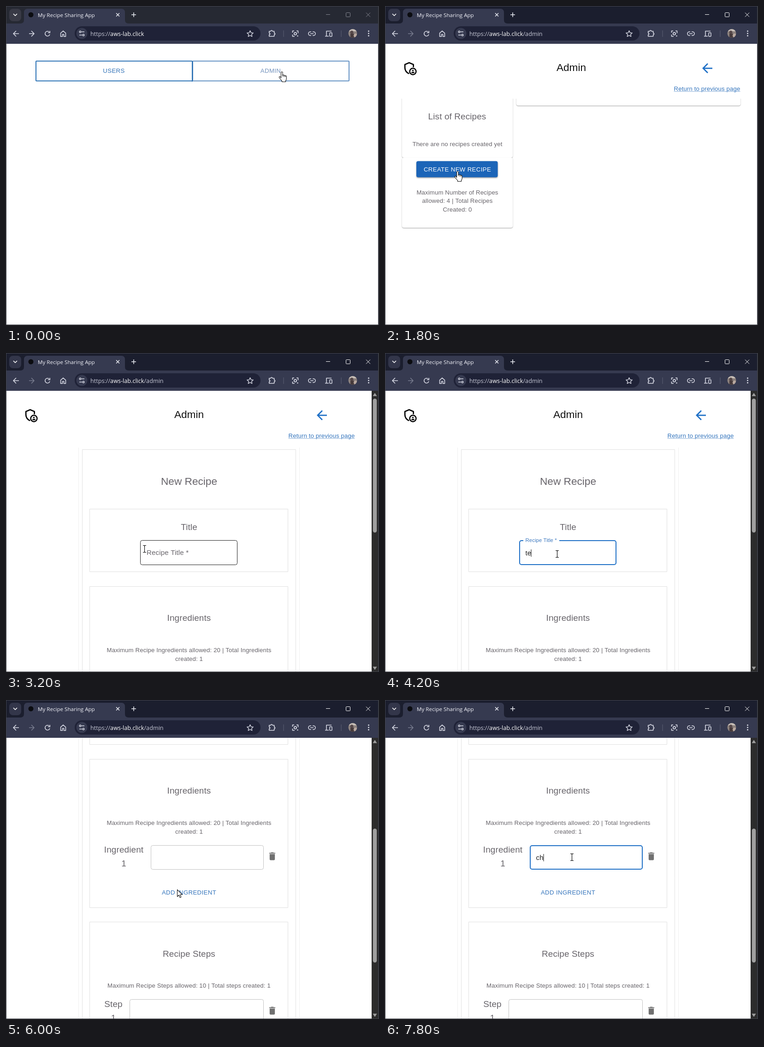
Animation of 809 by 692 pixels, one loop 8000 ms. Source, as an HTML page with a canvas:

```html
<!DOCTYPE html>
<html lang="en">
<head>
<meta charset="utf-8">
<title>My Recipe Sharing App</title>
<style>
html, body { margin: 0; width: 100%; height: 100%; overflow: hidden; background: #fff; }
canvas { display: block; }
</style>
</head>
<body>
<canvas id="stage" width="809" height="692"></canvas>
<script>
const ctx = document.getElementById('stage').getContext('2d');
const LOOP = 8000, STEP = 200;
const PAGE = '"Liberation Sans", Arial, sans-serif';
const UI = '"Open Sans", "Noto Sans", sans-serif';
const BLUE = '#1f70c6', GREY = '#67646a', LINE = '#e0e0e0', INK = '#d9dbe6';

// type styles: size, letter spacing in em
const H5 = [22.65, 0], H6 = [18.88, .0075], BODY = [13.2, .0107],
      INPUT = [15.1, .0094], BUTTON = [13.2, .0286], SMALL = [11.3, .0094];

// pointer path: time, x, y, shape
const POINTER = [
  [0, 592, 142, 'hand'], [200, 591, 138, 'hand'], [600, 591, 138, 'arrow'],
  [1000, 564, 148, 'arrow'], [1200, 440, 215, 'arrow'], [1400, 270, 300, 'arrow'],
  [1600, 160, 352, 'hand'], [1800, 151, 358, 'hand'], [2400, 152, 358, 'arrow'],
  [2800, 152, 358, 'arrow'], [3200, 300, 425, 'beam'], [3400, 373, 436, 'beam'],
  [4800, 373, 436, 'beam'], [5000, 375, 441, 'beam'], [5600, 375, 441, 'beam'],
  [5800, 371, 411, 'arrow'], [6000, 371, 411, 'arrow'], [6400, 396, 360, 'beam'],
  [6600, 405, 341, 'beam'], [LOOP, 405, 341, 'beam']
];
const SCROLL = [[0, 0], [5000, 375], [5200, 285], [5400, 340], [5600, 402], [5800, 378]];
const TITLE = [[0, ''], [4000, 't'], [4200, 'te'], [4600, 'tes'], [4800, 'test']];
const ITEM = [[0, ''], [7600, 'c'], [7800, 'ch']];

const ICON = {
  back: new Path2D('M20 11H7.83l5.59-5.59L12 4l-8 8 8 8 1.41-1.41L7.83 13H20v-2z'),
  bin: new Path2D('M6 19c0 1.1.9 2 2 2h8c1.1 0 2-.9 2-2V7H6v12zM19 4h-3.5l-1-1h-5l-1 1H5v2h14V4z'),
  shield: new Path2D('M17 10V6L10.5 3.2 4 6v5c0 4 2.6 7.6 6.5 8.9'),
  puzzle: new Path2D('M4 6h4.5a2.3 2.3 0 0 1 4.6 0H18v4.9a2.3 2.3 0 0 1 0 4.6V20H4v-4.5a2.3 2.3 0 0 0 0-4.6z'),
  star: new Path2D('M12 3.5l2.6 5.7 6.2.7-4.6 4.2 1.3 6.1L12 17.1l-5.5 3.1 1.3-6.1-4.6-4.2 6.2-.7z'),
  home: new Path2D('M5 10.5l7-6 7 6V20h-5v-6h-4v6H5z'),
  arrow: new Path2D('M.5.5V15.5L4 12.2 6.4 17.7 8.9 16.6 6.6 11.2H11.3Z'),
  hand: new Path2D('M4.5 14V2.5a1.8 1.8 0 0 1 3.6 0V8q1.7-1.4 3 .6 1.7-1 2.7.8 2.4-.7 2.4 1.8V16q0 2.5-1.7 4v2.5H6.5V20.5L1 14Q-.5 11.5 1.8 11Q3 11.2 4.5 14Z')
};

const at = (list, t) => list.reduce((v, k) => t >= k[0] ? k[1] : v, list[0][1]);

function pointer(t) {
  let i = 0;
  while (i < POINTER.length - 2 && t >= POINTER[i + 1][0]) i++;
  const [t0, x0, y0, shape] = POINTER[i], [t1, x1, y1] = POINTER[i + 1];
  const u = (t - t0) / (t1 - t0);
  return { x: x0 + (x1 - x0) * u, y: y0 + (y1 - y0) * u, shape };
}

function rect(x, y, w, h, fill) { ctx.fillStyle = fill; ctx.fillRect(x, y, w, h); }

function round(x, y, w, h, r, fill, stroke, width = 1) {
  ctx.beginPath();
  ctx.roundRect(x, y, w, h, r);
  if (fill) { ctx.fillStyle = fill; ctx.fill(); }
  if (stroke) { ctx.strokeStyle = stroke; ctx.lineWidth = width; ctx.stroke(); }
}

function disc(x, y, r, fill, stroke, width = 1.5) {
  ctx.beginPath();
  ctx.arc(x, y, r, 0, 7);
  if (fill) { ctx.fillStyle = fill; ctx.fill(); }
  if (stroke) { ctx.strokeStyle = stroke; ctx.lineWidth = width; ctx.stroke(); }
}

// each argument after the width is one polyline of x, y pairs
function lines(color, width, ...runs) {
  ctx.strokeStyle = color;
  ctx.lineWidth = width;
  ctx.beginPath();
  for (const p of runs)
    for (let i = 0; i < p.length; i += 2) ctx[i ? 'lineTo' : 'moveTo'](p[i], p[i + 1]);
  ctx.stroke();
}

function icon(path, cx, cy, scale, color, width) {
  ctx.save();
  ctx.translate(cx - 12 * scale, cy - 12 * scale);
  ctx.scale(scale, scale);
  ctx.fillStyle = ctx.strokeStyle = color;
  if (width) { ctx.lineWidth = width; ctx.stroke(path); } else ctx.fill(path);
  ctx.restore();
}

function text(str, x, y, [size, gap], color, align = 'center', font = PAGE) {
  ctx.font = `${size}px ${font}`;
  ctx.letterSpacing = `${gap * size}px`;
  ctx.fillStyle = color;
  const w = ctx.measureText(str).width;
  ctx.fillText(str, align === 'center' ? x - w / 2 : x, y);
  return w;
}

function windowBar(active, admin) {
  rect(0, 0, 809, 82, active ? '#1b1e2e' : '#262933');
  round(7, 6, 26, 27, 8, active ? '#33364a' : '#393a46');
  lines('#fff', 1.6, [16, 17, 20, 21, 24, 17]);
  const bar = '#363a50';
  ctx.fillStyle = bar;
  ctx.beginPath();
  ctx.moveTo(31, 38);
  ctx.quadraticCurveTo(39, 38, 39, 30);
  ctx.lineTo(39, 14);
  ctx.quadraticCurveTo(39, 6, 47, 6);
  ctx.lineTo(250, 6);
  ctx.quadraticCurveTo(258, 6, 258, 14);
  ctx.lineTo(258, 30);
  ctx.quadraticCurveTo(258, 38, 266, 38);
  ctx.fill();
  rect(1, 38, 807, 44, bar);
  disc(54, 19, 5.5, '#0b0c10');
  text('My Recipe Sharing App', 69, 24, [11.6, 0], '#f1f2f8', 'left', UI);
  lines('#eceef5', 1.5, [239, 15.5, 246, 22.5], [246, 15.5, 239, 22.5],
    [272, 19, 282, 19], [277, 14, 277, 24]);
  const ctl = active ? '#fff' : '#868892';
  lines(ctl, 1, [694, 18.5, 703, 18.5], [781, 14.5, 790, 23.5], [790, 14.5, 781, 23.5]);
  round(737.5, 14.5, 9, 9, 1, null, ctl);
  toolbar(admin);
}

function toolbar(admin) {
  lines(INK, 1.6, [28, 60, 16, 60], [22, 54, 16, 60, 22, 66]);
  lines(admin ? '#777b8d' : INK, 1.6, [50, 60, 61, 60], [55, 54, 61, 60, 55, 66]);
  ctx.strokeStyle = INK;
  ctx.beginPath();
  ctx.arc(90, 60, 5.2, .3, 5.4);
  ctx.stroke();
  rect(91, 57, 5, 1.6, INK);
  rect(94.4, 54, 1.6, 4.6, INK);
  icon(ICON.home, 124, 60, .78, INK, 2);

  round(149, 44, 403, 31, 15.5, '#1f2237');
  disc(164.5, 59.5, 12, '#363a50');
  lines(INK, 1.5, [164, 56, 170, 56], [159, 63, 165, 63]);
  disc(161, 56, 1.8, null, INK, 1.4);
  disc(168, 63, 1.8, null, INK, 1.4);
  const style = [12.65, 0];
  let x = 183;
  x += text('https://', x, 64.5, style, '#c9cbd8', 'left', UI);
  x += text('aws-lab.click', x, 64.5, style, '#fff', 'left', UI);
  if (admin) text('/admin', x, 64.5, style, '#c9cbd8', 'left', UI);

  icon(ICON.star, 529.5, 60, .76, INK, 1.8);
  icon(ICON.puzzle, 577, 59.5, .78, INK, 2);
  rect(601.5, 53, 1, 14, '#5c6074');
  rect(726.5, 53, 1, 14, '#5c6074');
  lines(INK, 1.6, [621.5, 58, 621.5, 54, 625, 54], [630, 54, 633.5, 54, 633.5, 59],
    [621.5, 62, 621.5, 66, 626, 66]);
  disc(627.5, 60, 2.7, null, INK, 1.7);
  disc(632.5, 65, 1.3, INK);
  lines(INK, 1.6, [662, 56, 660, 56], [662, 64, 660, 64], [665, 56, 667, 56],
    [665, 64, 667, 64], [660, 60, 667, 60]);
  ctx.beginPath();
  ctx.arc(660, 60, 4, Math.PI / 2, Math.PI * 1.5);
  ctx.moveTo(667, 56);
  ctx.arc(667, 60, 4, -Math.PI / 2, Math.PI / 2);
  ctx.stroke();
  lines(INK, 1.6, [706, 54.5, 695, 54.5, 695, 65], [692, 65.5, 700, 65.5]);
  round(702, 58, 5, 8, 1, null, INK, 1.5);
  disc(752, 59.5, 9.5, '#8b817d');
  ctx.save();
  ctx.clip();
  rect(742, 49, 20, 6, '#c6bdb6');
  rect(747, 60, 8, 10, '#473b3c');
  disc(750, 57, 3.5, '#564849');
  disc(758, 64, 4, '#b9a9a0');
  ctx.restore();
  for (const y of [54.5, 59.5, 64.5]) disc(786.5, y, 1.5, INK);
}

function homePage() {
  round(65, 119.5, 339, 43, 1, null, '#2a72b5', 2);
  round(405, 119.5, 339, 43, 1, null, '#6391c3', 2);
  rect(403, 119, 2, 45, '#2a72b5');
  text('USERS', 234, 145, BUTTON, '#3273b8');
  text('ADMIN', 574, 145, BUTTON, '#7292bd');
}

function header(mid, right) {
  icon(ICON.shield, 54.5, 135.5, 1.42, '#000', 1.9);
  disc(60.5, 142, 8.4, '#fff');
  disc(60.5, 142, 6.9, '#fff', '#000', 2.5);
  disc(60.5, 139.9, 1.7, '#000');
  round(57.2, 142.8, 6.6, 3, 1.5, '#000');
  text('Admin', mid, 141, H5, '#111');
  icon(ICON.back, right - 72, 135, 1.375, BLUE);
  const x = right - 144.5;
  const w = text('Return to previous page', x, 183.5, BODY, '#3475bd', 'left');
  rect(x, 185, w, 1, '#8fb2da');
}

function paper(x, y, w, h) {
  ctx.save();
  ctx.shadowColor = 'rgba(0,0,0,.38)';
  ctx.shadowBlur = 2;
  ctx.shadowOffsetY = 1;
  round(x, y, w, h, 4, '#fff');
  ctx.restore();
}

function adminPage(hover) {
  paper(37, 190, 240, 139);
  paper(37, 329, 240, 152);
  paper(285, 190, 486, 26);
  rect(30, 186, 750, 15, '#fff');
  header(404, 771);
  text('List of Recipes', 156.5, 246, H6, GREY);
  text('There are no recipes created yet', 157, 303.5, BODY, GREY);
  ctx.save();
  ctx.shadowColor = 'rgba(0,0,0,.4)';
  ctx.shadowBlur = 3;
  ctx.shadowOffsetY = 1.5;
  round(68, 336.5, 176.5, 35, 4, hover ? '#1c65b8' : '#2477cf');
  ctx.restore();
  text('CREATE NEW RECIPE', 157, 358.5, BUTTON, '#fff');
  ['Maximum Number of Recipes', 'allowed: 4 | Total Recipes', 'Created: 0']
    .forEach((s, i) => text(s, 157, 408.5 + i * 18.9, BODY, GREY));
}

// returns the x where the typed value ends
function field(x, y, w, h, state, value, baseline) {
  const focus = state === 'focus', line = focus ? 2 : 1;
  round(x + line / 2, y + line / 2, w - line, h - line, 4, '#fff',
    focus ? BLUE : state === 'hover' ? '#222' : '#c2c2c2', line);
  return x + 13.5 + text(value, x + 13.5, baseline, INPUT, '#222', 'left');
}

const caret = (x, y) => rect(Math.round(x) - .5, y, 1, 16, '#111');

function card(y, h) {
  ctx.strokeStyle = LINE;
  ctx.lineWidth = 1;
  ctx.strokeRect(181.5, y + .5, 430, h);
}

function formPage(t, mouse) {
  const scroll = at(SCROLL, t), last = at(SCROLL, t - STEP);
  const over = (x, y, w, h) => mouse.x > x && mouse.x < x + w &&
    mouse.y + last > y && mouse.y + last < y + h;
  const inTitle = t >= 3600 && t < 6800, inItem = t >= 6800;
  const title = at(TITLE, t), item = at(ITEM, t), mid = 397;

  ctx.save();
  ctx.translate(0, -scroll);
  header(mid, 757);
  rect(157, 205, 1, 1200, '#efefef');
  rect(636, 205, 1, 1200, '#efefef');
  ctx.strokeStyle = LINE;
  ctx.lineWidth = 1;
  ctx.strokeRect(165.5, 209.5, 463, 1200);
  text('New Recipe', mid, 286, H5, GREY);

  card(338, 136);
  text('Title', mid, 384, H6, GREY);
  const titleState = inTitle ? 'focus' : over(291, 406, 211, 54) ? 'hover' : '';
  const end = field(291, 406, 211, 54, titleState, title, 439);
  if (inTitle || title) {
    rect(300, 404, 78, 5, '#fff');
    text('Recipe Title *', 304.5, 410, SMALL, inTitle ? '#3c78bf' : GREY, 'left');
  } else text('Recipe Title *', 305, 438, INPUT, GREY, 'left');
  if (inTitle && t < 5000) caret(end, 426);

  card(506, 322);
  text('Ingredients', mid, 581, H6, GREY);
  text('Maximum Recipe Ingredients allowed: 20 | Total Ingredients', mid, 648.5, BODY, GREY);
  text('created: 1', mid, 667.5, BODY, GREY);
  text('Ingredient', 255.5, 709, H6, GREY);
  text('1', 255.5, 739, H6, GREY);
  const itemState = inItem ? 'focus' : over(314, 693, 245, 53) ? 'hover' : '';
  const tail = field(314, 693, 245, 53, itemState, item, 725);
  if (inItem) caret(tail, 712);
  icon(ICON.bin, 577.5, 717, .944, '#707070');
  text('ADD INGREDIENT', mid, 800, BUTTON, '#3575bc');

  card(859, 500);
  text('Recipe Steps', mid, 934.5, H6, GREY);
  text('Maximum Recipe Steps allowed: 10 | Total steps created: 1', mid, 1002, BODY, GREY);
  text('Step', 233, 1043.5, H6, GREY);
  text('1', 233, 1073.5, H6, GREY);
  field(268, 1027, 291, 53, '', '', 1060);
  icon(ICON.bin, 577.5, 1052, .944, '#707070');
  ctx.restore();

  rect(793, 82, 14, 609, '#2c2c2c');
  round(795.8, 99 + scroll * .476, 8.4, 290.5, 4.2, '#9f9f9f');
  ctx.fillStyle = '#9f9f9f';
  for (const [y, d] of [[90, 1], [684, -1]]) {
    ctx.beginPath();
    ctx.moveTo(795.5, y + 3.5 * d);
    ctx.lineTo(804.5, y + 3.5 * d);
    ctx.lineTo(800, y - 3.5 * d);
    ctx.fill();
  }
}

function drawPointer({ x, y, shape }) {
  x = Math.round(x);
  y = Math.round(y);
  if (shape === 'beam') {
    const half = d => [x + d * 3.5 + .5, y - 7.5, x + d + .5, y - 7.5, x + .5, y - 6.5,
      x + .5, y + 6.5, x + d + .5, y + 7.5, x + d * 3.5 + .5, y + 7.5];
    lines('#111', 1.2, half(-1), half(1));
    return;
  }
  ctx.save();
  ctx.translate(x, y);
  ctx.fillStyle = '#fff';
  ctx.strokeStyle = '#111';
  ctx.lineWidth = 1.1;
  ctx.fill(ICON[shape]);
  ctx.stroke(ICON[shape]);
  if (shape === 'hand') lines('#111', 1, [8.1, 7, 8.1, 11], [11, 8.5, 11, 12], [13.8, 9.5, 13.8, 12]);
  ctx.restore();
}

function draw(t) {
  const mouse = pointer(t), admin = t >= 600;
  ctx.lineJoin = 'round';
  rect(0, 0, 809, 692, '#fff');
  ctx.save();
  ctx.beginPath();
  ctx.rect(1, 82, 806, 609);
  ctx.clip();
  if (!admin) homePage();
  else if (t < 2400) adminPage(mouse.shape === 'hand');
  else formPage(t, mouse);
  ctx.restore();
  windowBar(admin, admin);
  rect(0, 0, 809, 1, '#44464f');
  rect(0, 0, 1, 692, '#3f4149');
  rect(807, 0, 2, 692, '#3a3c44');
  rect(0, 691, 809, 1, '#3f4149');
  if (t >= 2200 && t < 2600) disc(151.5, 359, 10.7, 'rgba(226,60,88,.62)', '#dc4a63', 1);
  drawPointer(mouse);
}

function tick(now) {
  draw(Math.floor(now % LOOP / STEP) * STEP);
  requestAnimationFrame(tick);
}
draw(0);
requestAnimationFrame(tick);
</script>
</body>
</html>
```
